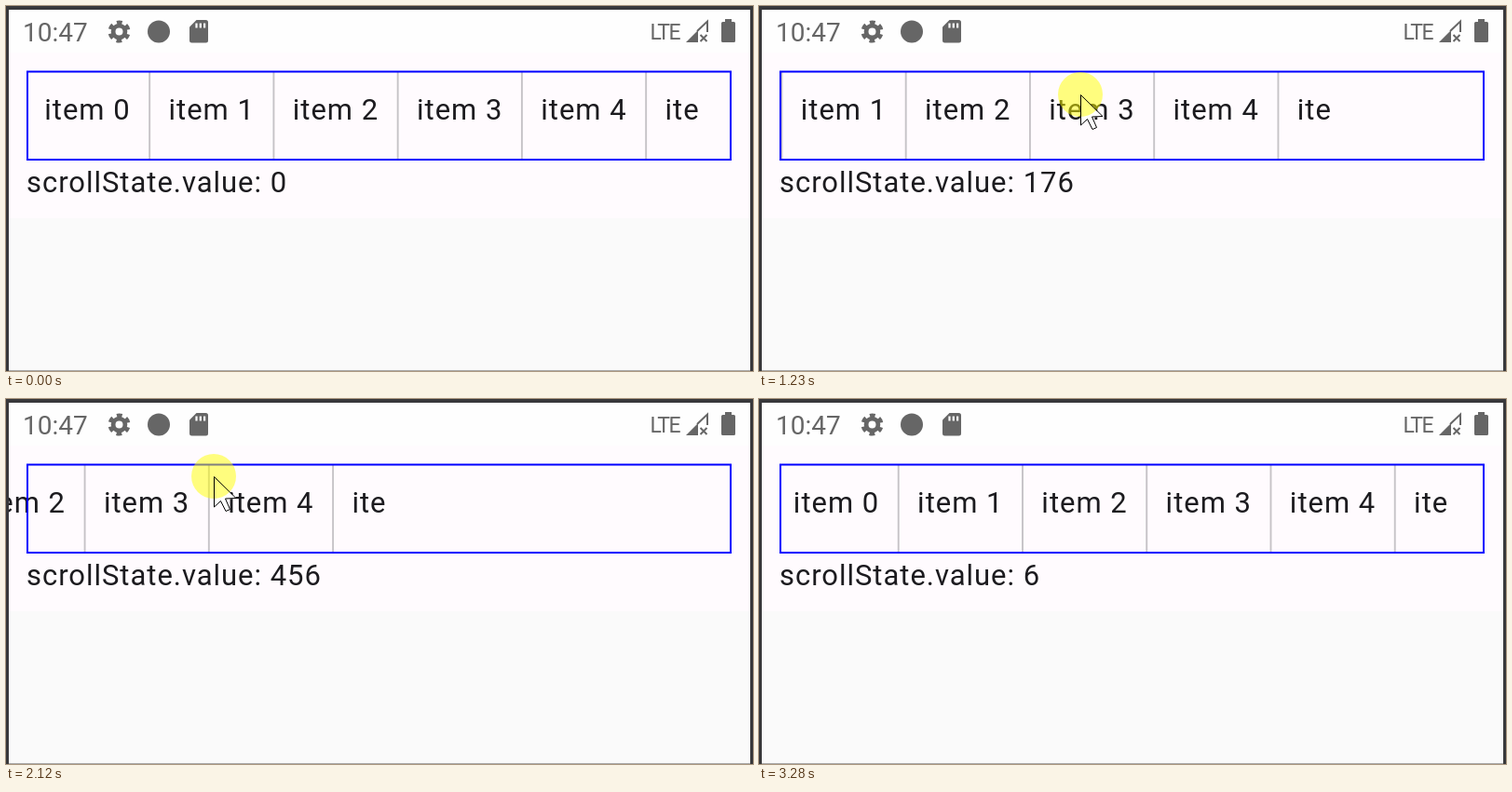
These frames come from a looping animation (802x392 px, 4.08 s). An HTML page:

```html
<!DOCTYPE html>
<html lang="en">
<head>
<meta charset="utf-8">
<title>Horizontal scroll demo</title>
<style>
  html, body { margin: 0; width: 100%; height: 100%; overflow: hidden; background: #fafafa; }
  svg { display: block; width: 802px; height: 392px; }
  text { font-family: Roboto, sans-serif; white-space: pre; }
  .body { font-size: 31px; letter-spacing: .967px; fill: #1c1b1f; }
  .status { fill: #666; }
</style>
</head>
<body>
<svg viewBox="0 0 802 392">
  <clipPath id="screen"><rect x="3" y="3" width="796" height="388"/></clipPath>

  <rect width="802" height="392" fill="#38383b"/>
  <rect x="3" y="4" width="796" height="47" fill="#fefefe"/>
  <rect x="3" y="50" width="796" height="178" fill="#fffbfe"/>
  <rect x="3" y="228" width="796" height="163" fill="#fafafa"/>
  <rect x="3" y="391" width="796" height="1" fill="#aaa"/>

  <!-- status bar -->
  <g class="status">
    <text x="18" y="37.5" font-size="28">10:47</text>
    <g transform="translate(121.5 27.5)" fill="none" stroke="#666">
      <circle r="6.4" stroke-width="4.8"/>
      <circle r="10" stroke-width="4" stroke-dasharray="5.6 4.87" stroke-dashoffset="2.8" transform="rotate(30)"/>
    </g>
    <circle cx="164" cy="27.5" r="12"/>
    <path d="M204.500 15H214.500Q217 15 217 17.500V37Q217 39.500 214.500 39.500H199.500Q197 39.500 197 37V22.500Z"/>
    <path d="M204.500 18.500v5m4.300-5v5m4.300-5v5" stroke="#fefefe" stroke-width="2.2"/>
    <text x="691.5" y="36" font-size="23" letter-spacing="-1.5">LTE</text>
    <path d="M730 39L743 26V39Z"/>
    <path d="M742 27L753 16.500V28M745.500 31l7 7m0-7l-7 7" fill="none" stroke="#666" stroke-width="2"/>
    <path d="M772 14h7v3h2.500q1.500 0 1.500 1.500v19q0 1.500-1.500 1.500h-12q-1.500 0-1.500-1.500v-19q0-1.500 1.500-1.500h2.500z"/>
  </g>

  <g clip-path="url(#screen)"><g id="row"></g></g>
  <rect x="23" y="70.500" width="755" height="94.500" fill="none" stroke="#00f" stroke-width="2"/>
  <text id="label" class="body" x="22" y="199.500"></text>

  <g id="pointer">
    <path d="M0 0V33L7.500 26.500 13 38 18 35.500 13 24.500 24 24Z" fill="#fff"/>
    <circle id="press" r="24" fill="#ff0" fill-opacity=".5"/>
    <path d="M.5 .5V33L7.500 26.500 13 37.500 17.500 35.500 12.500 24 24 23.500Z" fill="none" stroke="#000"/>
  </g>
</svg>
<script>
const LOOP = 4080, START = 130, TICK = 68.4, LAST = 46;
const PITCH = 133.25, PX_PER_UNIT = 0.737;

// tick, pointer x, pointer y, scroll value
const KEYS = [
  [0, 676, 378, 0], [2, 618, 255, 0], [4, 566, 160, 0], [6, 547, 119, 0],
  [9, 547, 119, 0], [11, 520, 114, 0], [13, 443, 101, 67], [16, 345, 95, 176],
  [20, 219, 83, 410], [22, 192, 83, 460], [24, 180, 83, 480], [26, 180, 83, 480],
  [29, 223, 83, 456], [30, 275, 84, 422], [31, 350, 86, 358], [33, 530, 94, 128],
  [34, 610, 98, 1], [35, 660, 100, 0], [37, 715, 101, 0], [40, 742, 104, 0],
  [42, 742, 104, 0], [43, 738, 125, 4], [45, 777, 344, 6], [46, 777, 344, 6]
];

const $ = id => document.getElementById(id);
const show = (id, on) => $(id).setAttribute("visibility", on ? "inherit" : "hidden");
const move = (id, x, y) => $(id).setAttribute("transform", `translate(${x} ${y})`);

$("row").innerHTML = ["item 0", "item 1", "item 2", "item 3", "item 4", "ite"].map((name, i) =>
  `<text class="body" x="${41.3 + i * PITCH}" y="122.3">${name}</text>` +
  (i < 5 ? `<rect x="${153.2 + i * PITCH}" y="70" width="1.9" height="95" fill="#c6c3c7"/>` : "")
).join("");

function sample(tick) {
  const i = Math.max(1, KEYS.findIndex(k => k[0] >= tick));
  const a = KEYS[i - 1], b = KEYS[i];
  const p = (tick - a[0]) / (b[0] - a[0]);
  return a.map((v, j) => v + (b[j] - v) * p);
}

function draw(now) {
  const tick = Math.floor((now % LOOP - START) / TICK);
  const [, x, y, raw] = sample(Math.min(LAST, Math.max(0, tick)));
  const value = Math.round(raw);
  move("row", -value * PX_PER_UNIT, 0);
  $("label").textContent = "scrollState.value: " + value;
  move("pointer", Math.round(x), Math.round(y));
  $("pointer").setAttribute("visibility", tick >= 0 && tick < LAST ? "visible" : "hidden");
  show("press", tick >= 9 && tick < 43);
  if (tick < 0 || tick >= LAST) show("press", false);
}

const begin = performance.now();
(function loop() {
  draw(performance.now() - begin);
  requestAnimationFrame(loop);
})();
</script>
</body>
</html>
```
